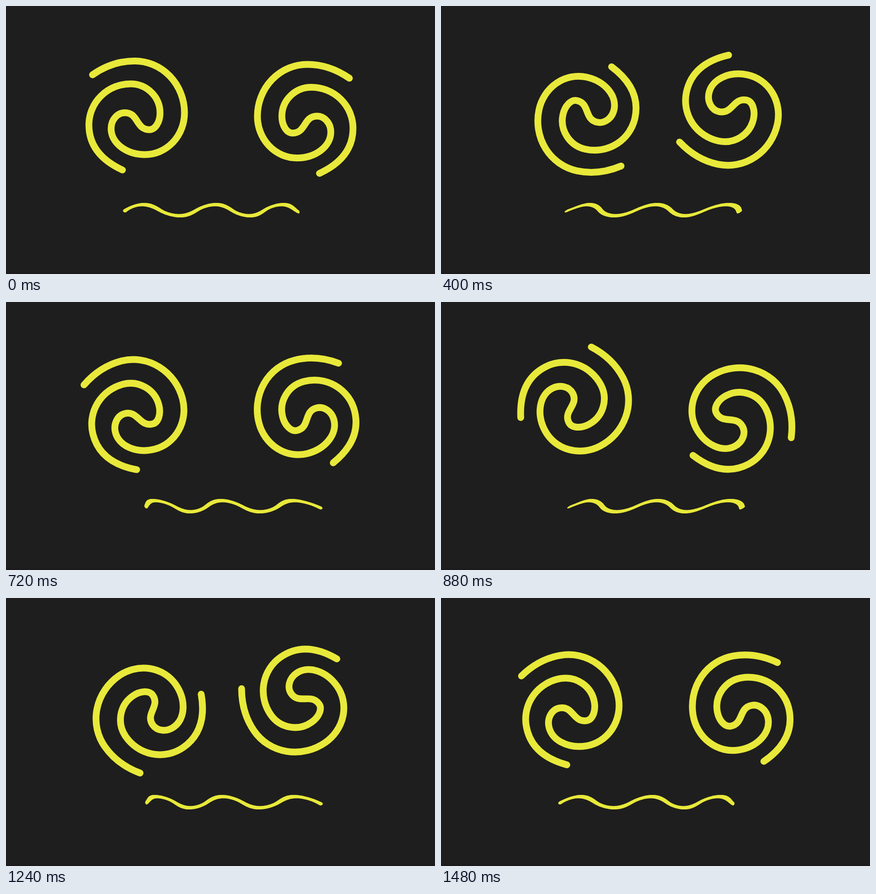
An HTML page for the animation above (1520 ms loop, 947 px wide and 592 px high).

```html
<!DOCTYPE html>
<html lang="en">
<head>
<meta charset="utf-8">
<title>Dizzy face</title>
<style>
  html, body { margin: 0; width: 100%; height: 100%; overflow: hidden; background: #1e1e1e; }
  svg { display: block; width: 100vw; height: 100vh; }
  #swirl { fill: none; stroke: #e8e93a; stroke-width: 15; stroke-linecap: round; }
  #mouth { fill: #e8e93a; }
</style>
</head>
<body>
<svg viewBox="0 0 947 592">
  <defs>
    <!-- quarter ellipses wound around an S, with a loose tail at each end -->
    <path id="swirl" d="M191 152 Q235 121.4 284 121.4
      a110 114.6 0 0 1 110 114.6
      a87 92.2 0 0 1 -87 92.2
      a75 57.2 0 0 1 -75 -57.2
      a30.5 35.3 0 0 1 30.5 -35.3
      c30 0 24 37.5 54 37.5
      a23.5 37.2 0 0 0 23.5 -37.2
      a65 64 0 0 0 -65 -64
      a92 90.5 0 0 0 -92 90.5
      Q183 328 257 362.2"/>
  </defs>
  <rect width="947" height="592" fill="#1e1e1e"/>
  <rect y="589" width="947" height="3" fill="#1c181b"/>
  <g id="left"><use href="#swirl"/></g>
  <g id="right"><use href="#swirl" transform="translate(949 7.5) scale(-1 1)"/></g>
  <path id="mouth"/>
</svg>
<script>
const LOOP = 1520, STEP = 40;
const RAD = Math.PI / 180;
const $ = id => document.getElementById(id);
const cos = deg => Math.cos(deg * RAD);
const sin = deg => Math.sin(deg * RAD);

// Mouth at rest: parabolic arches, 180 degrees each, squeezed at the left end.
const FIRST = -95, LAST = 824, HALF = 3.8;

function centre(p) {
  const n = Math.floor((p + 90) / 180);
  const v = (p - n * 180) / 90;
  const arch = (n % 2 ? -1 : 1) * (1 - v * v);
  return [317 + p * (p < 0 ? 0.32 : 0.428), 451 - 12.3 * arch];
}

function heading(p) {
  const [x0, y0] = centre(p - 2), [x1, y1] = centre(p + 2);
  return Math.atan2(y1 - y0, x1 - x0) / RAD;
}

function outline() {
  const pts = [];
  const add = (p, turn) => {
    const [x, y] = centre(p), a = heading(p) + turn;
    pts.push([x + HALF * cos(a), y + HALF * sin(a)]);
  };
  for (let p = FIRST; p < LAST; p += 5) add(p, -90);
  for (let a = -90; a < 90; a += 15) add(LAST, a);
  for (let p = LAST; p > FIRST; p -= 5) add(p, 90);
  for (let a = 90; a < 270; a += 15) add(FIRST, a);
  return pts;
}

const lips = outline();

// Rows sway sideways one after another, widest at the mouth's ends.
function warp([x, y], phase) {
  const reach = 11 + 13 * ((x - 474) / 187) ** 2;
  const sway = reach * cos(phase - 180 + 3 * (y - 452));
  return (x + sway).toFixed(2) + ' ' + y.toFixed(2);
}

function draw(now) {
  const t = Math.floor(now % LOOP / STEP) * STEP;
  const spin = t * 0.48, phase = t * 0.72;
  $('left').setAttribute('transform', `rotate(${spin} 304.8 241.9)`);
  $('right').setAttribute('transform', `rotate(${spin} 649.7 242.1)`);
  $('mouth').setAttribute('d', 'M' + lips.map(pt => warp(pt, phase)).join('L') + 'Z');
}

function tick(now) {
  draw(now);
  requestAnimationFrame(tick);
}

draw(0);
requestAnimationFrame(tick);
</script>
</body>
</html>
```
